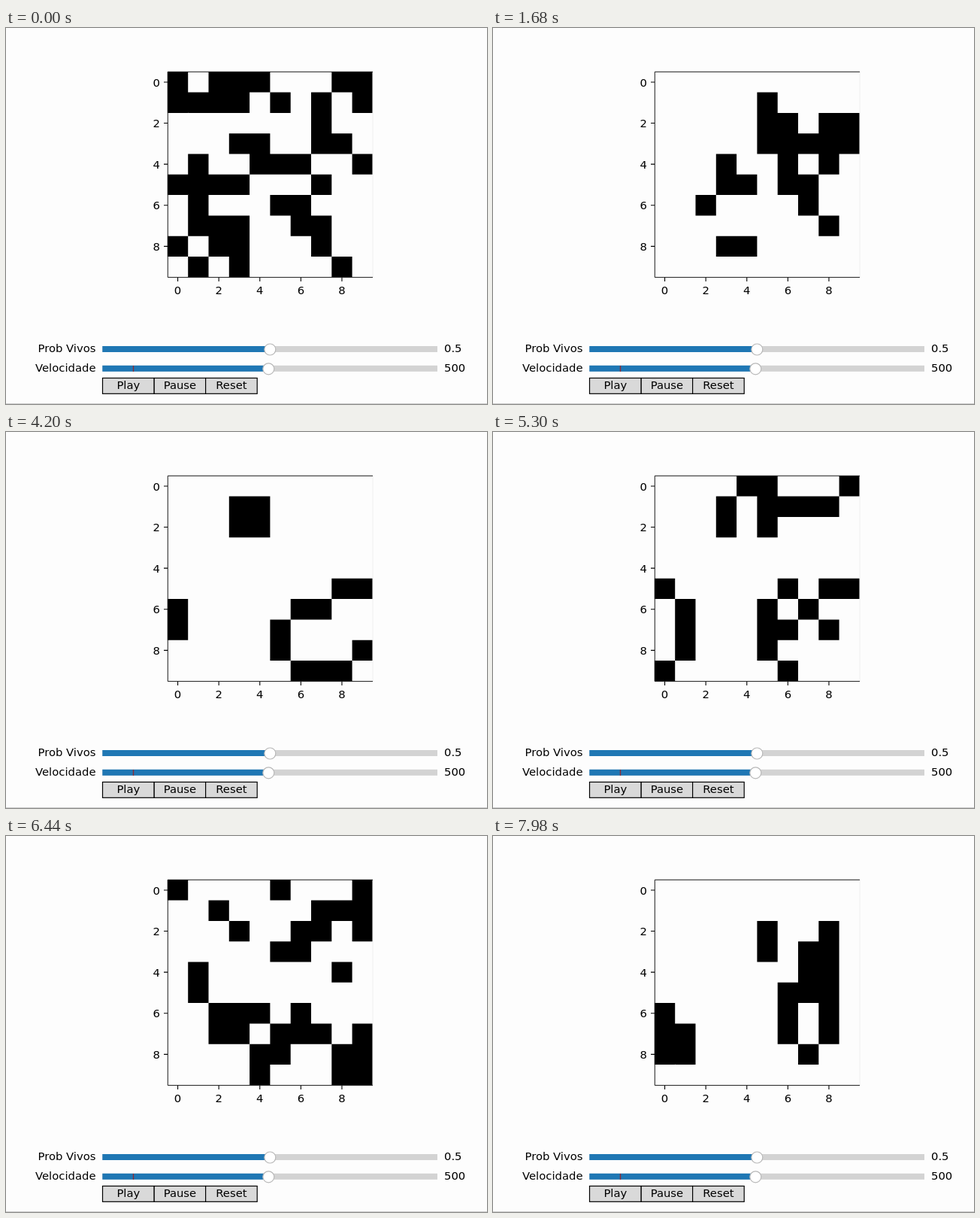
Write an HTML page that moves like this. It is 640 px wide and 500 px high and loops after 8000 ms.

```html
<!DOCTYPE html>
<html lang="pt">
<head>
<meta charset="utf-8">
<title>Jogo da Vida</title>
<style>
  html, body { margin: 0; width: 100%; height: 100%; overflow: hidden; background: #fdfdfd; }
  svg { display: block; width: 640px; height: 500px; }
  text { font: 14.8px "DejaVu Sans", sans-serif; fill: #000; }
  .mid { text-anchor: middle; }
  .end { text-anchor: end; }
  .spine { fill: none; stroke: #000; stroke-width: 0.9; }
  .track { fill: #d3d3d3; }
  .value { fill: #1f77b4; }
  .knob { fill: #fff; stroke: #b8b8b8; stroke-width: 1.2; }
  .button { fill: #d9d9d9; stroke: #000; stroke-width: 1.2; }
</style>
</head>
<body>
<svg viewBox="0 0 640 500">
  <path id="cells"/>
  <path d="M488 58V332" stroke="#efefef"/>
  <path d="M488 58.3H215.3V331.6H488" class="spine"/>
  <g id="axes"></g>
  <g id="controls"></g>
  <path d="M0 499.5H640" stroke="#cfcfcf"/>
</svg>
<script>
const SIZE = 10, CELL = 27.3, LEFT = 214.9, TOP = 58.3;
const LOOP = 8000, GENERATIONS = 29;
const START = [
  "#.###...##",
  "####.#.#.#",
  ".......#..",
  "...##..##.",
  ".#..###..#",
  "####...#..",
  ".#...##...",
  ".###..##..",
  "#.##...#..",
  ".#.#....#."
].map(row => [...row].map(ch => ch === "#" ? 1 : 0));

// One step of Conway's rules on a torus.
function step(grid) {
  const at = (r, c) => grid[(r + SIZE) % SIZE][(c + SIZE) % SIZE];
  return grid.map((row, r) => row.map((alive, c) => {
    let sum = -alive;
    for (let dr = -1; dr <= 1; dr++)
      for (let dc = -1; dc <= 1; dc++) sum += at(r + dr, c + dc);
    return sum === 3 || (alive && sum === 2) ? 1 : 0;
  }));
}

const colX = c => +(LEFT + c * CELL).toFixed(2);
const rowY = r => +(TOP + r * CELL).toFixed(2);

function toPath(grid) {
  let d = "";
  grid.forEach((row, r) => row.forEach((alive, c) => {
    if (alive) d += `M${colX(c)} ${rowY(r)}H${colX(c + 1)}V${rowY(r + 1)}H${colX(c)}Z`;
  }));
  return d;
}

const paths = [];
for (let g = 0, grid = START; g < GENERATIONS; g++, grid = step(grid)) paths.push(toPath(grid));

const text = (x, y, label, cls = "") => `<text x="${x}" y="${y}" class="${cls}">${label}</text>`;

let axes = "";
for (let n = 0; n < SIZE; n += 2) {
  const x = colX(n + 0.5), y = rowY(n + 0.5);
  axes += `<path d="M210 ${y}H215M${x} 332V337" stroke="#000" stroke-width="1.1"/>`
    + text(205, y + 5.6, n, "end") + text(x, 353.6, n, "mid");
}
document.getElementById("axes").innerHTML = axes;

const slider = (y, knobX, label, value, mark = "") =>
  `<rect class="track" x="128.3" y="${y - 4}" width="445.7" height="8"/>
   <rect class="value" x="128.3" y="${y - 4}" width="${knobX - 128.3}" height="8"/>${mark}
   <circle class="knob" cx="${knobX}" cy="${y + 0.5}" r="7.5"/>`
  + text(119.5, y + 4.3, label, "end") + text(583, y + 4.3, value);

const button = (x, width, label) =>
  `<rect class="button" x="${x}" y="465.5" width="${width}" height="20.8"/>`
  + text(x + width / 2, 480.1, label, "mid");

document.getElementById("controls").innerHTML =
  slider(427, 351.3, "Prob Vivos", "0.5")
  + slider(452.8, 349.3, "Velocidade", "500", '<path d="M169.5 449V457" stroke="#8c2c34" stroke-width="1.4"/>')
  + button(128.5, 68.7, "Play") + button(197.2, 68.4, "Pause") + button(265.6, 68.6, "Reset");

// Ticks come in an uneven rhythm of 100, 20 and 20 ms.
function tickAt(time) {
  const t = time - 20;
  if (t < 0) return 0;
  const rest = t % 140;
  return 1 + 3 * Math.floor(t / 140) + (rest < 100 ? 0 : rest < 120 ? 1 : 2);
}

const cells = document.getElementById("cells");
let shown = -1;
function draw() {
  const tick = tickAt(performance.now() % LOOP);
  const generation = Math.max(0, Math.floor((tick - 1.2) / 5.93));
  if (generation !== shown) cells.setAttribute("d", paths[shown = generation]);
  requestAnimationFrame(draw);
}
draw();
</script>
</body>
</html>
```
